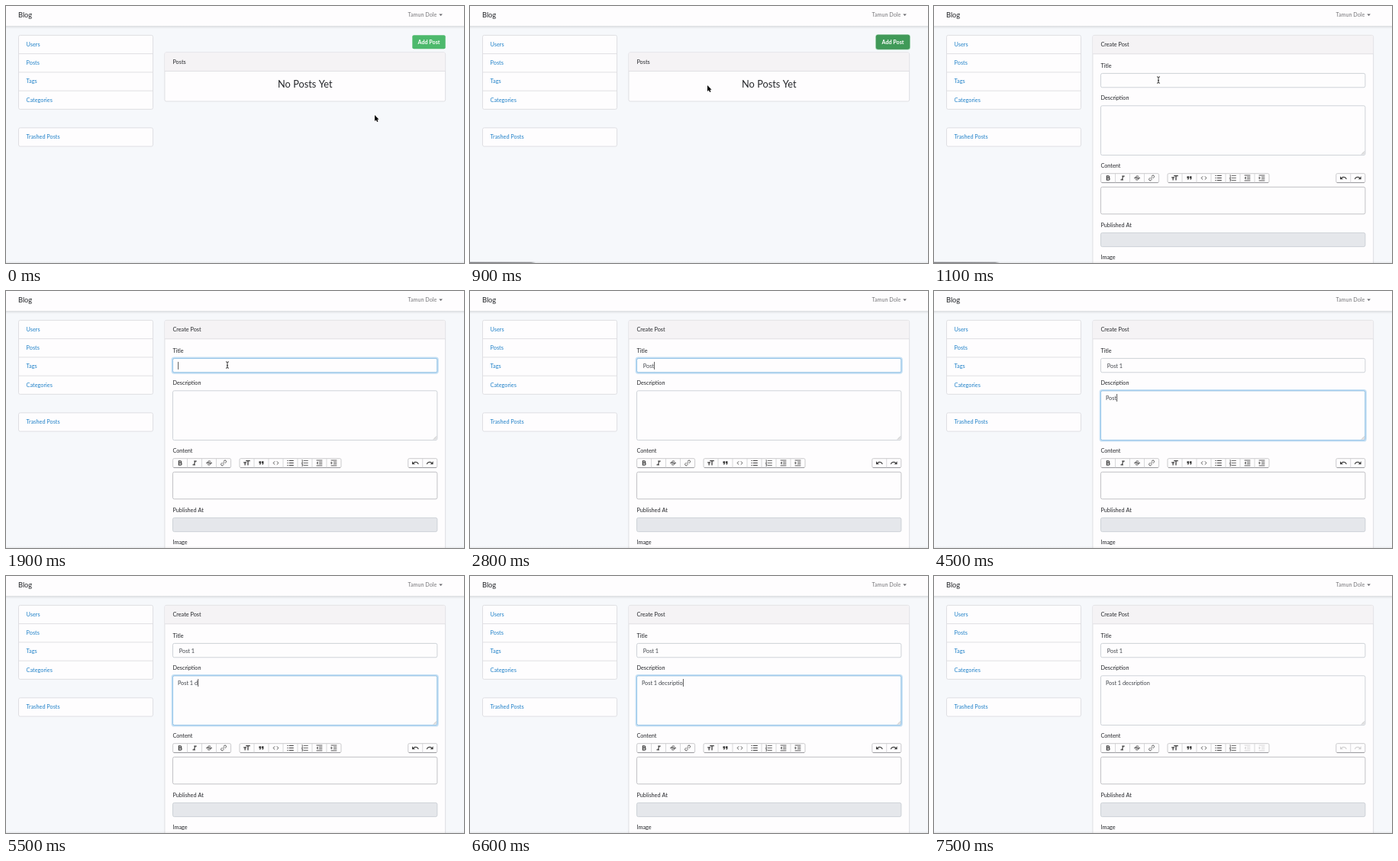
An HTML page with a canvas that plays this animation: 600x337 px, repeating every 8000 ms.

```html
<!DOCTYPE html>
<html lang="en">
<head>
<meta charset="utf-8">
<title>Blog</title>
<style>
html, body { margin: 0; width: 100%; height: 100%; overflow: hidden; background: #f6f8fb; }
canvas { display: block; width: 600px; height: 337px; }
</style>
</head>
<body>
<canvas id="stage"></canvas>
<script>
const W = 600, H = 337, LOOP = 8000, STEP = 100;
const canvas = document.getElementById('stage');
const ctx = canvas.getContext('2d');
const dpr = window.devicePixelRatio || 1;
canvas.width = Math.round(W * dpr);
canvas.height = Math.round(H * dpr);

const INK = '#24262a', LINK = '#1f80c8', LINE = '#dcdce0', FIELD = '#c9ced4', PAPER = '#fefdfe';
const FONT = 'Lato, "Open Sans", sans-serif';

const title = { text: ' Post 1', times: [2200, 2300, 2500, 2600, 2800, 3000, 3200] };
const summary = {
  text: 'Post 1 decsription',
  times: [4000, 4200, 4300, 4500, 4900, 5100, 5400, 5500, 5600, 5700, 5800, 6000, 6100, 6300, 6400, 6500, 6600, 6800]
};

// Pointer path: time, x, y
const track = [
  [0, 483, 143], [100, 488, 134], [300, 538, 62], [400, 550, 49], [600, 551, 48],
  [700, 520, 56], [800, 404, 86], [900, 311, 104], [1000, 297, 99], [1100, 294, 97],
  [1400, 294, 97], [1500, 291, 97], [1600, 290, 97]
];

// Icons on a 24 unit grid; "fill" ones are solid, the rest are stroked
const icons = {
  bold: { d: 'M8 6v12h5.5a3 3 0 0 0 0-6.2H8h4.7a2.9 2.9 0 0 0 0-5.8z', w: 2.8 },
  italic: { d: 'M10 6.3h8M6 17.7h8M14 6l-4 12', w: 2.7 },
  strike: { d: 'M3 12h18M17 7.5C14 5.5 8 5.5 8 9c0 2 2 3 4 3s4 1.5 4 3c0 3.5-6 3.5-9 1.5', w: 2.2 },
  link: { d: 'M9.5 14.5l5-5M11 8l3-3a3.5 3.5 0 0 1 5 5l-3 3M13 16l-3 3a3.5 3.5 0 0 1-5-5l3-3', w: 2 },
  heading: { d: 'M9 4v3h5v12h3V7h5V4zM2 9v3h3v7h3v-7h3V9z', fill: true },
  quote: { d: 'M6 17h3l2-4V7H5v6h3zM14 17h3l2-4V7h-6v6h3z', fill: true },
  code: { d: 'M9 7l-5 5 5 5M15 7l5 5-5 5', w: 2 },
  bullets: { d: 'M2.5 5h3M2.5 12h3M2.5 19h3M8 5h14M8 12h14M8 19h14', w: 2.6 },
  numbers: { d: 'M3 3h1.5v5M2.5 10h3l-3 4h3M2.5 16h3v5h-3M8 5h14M8 12h14M8 19h14', w: 1.8 },
  outdent: { d: 'M3 4h18M11 9.3h10M11 14.6h10M3 20h18M7 9l-3 3 3 3z', w: 2 },
  indent: { d: 'M3 4h18M11 9.3h10M11 14.6h10M3 20h18M4 9l3 3-3 3z', w: 2 },
  undo: { d: 'M12.5 8c-2.6 0-5 1-6.9 2.6L2 7v9h9l-3.6-3.6A8 8 0 0 1 20 16l2.4-.8A10.5 10.5 0 0 0 12.5 8z', fill: true },
  redo: { d: 'M11.5 8c2.6 0 5 1 6.9 2.6L22 7v9h-9l3.6-3.6A8 8 0 0 0 4 16l-2.4-.8A10.5 10.5 0 0 1 11.5 8z', fill: true }
};
for (const icon of Object.values(icons)) icon.path = new Path2D(icon.d);

const arrowPath = new Path2D('M0 0V8L1.8 6.3 3.1 9 4.5 8.3 3.2 5.8H5.5z');
const handPath = new Path2D('M0 0Q1-.9 1.8 0V3.3L5.2 4Q6 4.4 5.8 6L5 9H.7L-2 5.7Q-2 4.4 0 5.4z');

function text(str, x, mid, color = INK, size = 7.3, align = 'left', weight = 400) {
  ctx.font = `${weight} ${size}px ${FONT}`;
  ctx.textAlign = align;
  ctx.fillStyle = color;
  ctx.fillText(str, x, mid + size * 0.36);
}

function rect(x, y, w, h, color) {
  ctx.fillStyle = color;
  ctx.fillRect(x, y, w, h);
}

function box(x, y, w, h, r, fill, stroke, line = 0.9) {
  ctx.beginPath();
  ctx.roundRect(x, y, w, h, r);
  if (fill) { ctx.fillStyle = fill; ctx.fill(); }
  if (stroke) { ctx.strokeStyle = stroke; ctx.lineWidth = line; ctx.stroke(); }
}

function vGrad(y0, y1, from, to) {
  const g = ctx.createLinearGradient(0, y0, 0, y1);
  g.addColorStop(0, from);
  g.addColorStop(1, to);
  return g;
}

function navbar() {
  rect(0, 26, W, 4, vGrad(26, 30, 'rgba(0,0,0,.11)', 'rgba(0,0,0,0)'));
  rect(0, 0, W, 26, PAPER);
  text('Blog', 16, 12, INK, 9.3);
  text('Tamun Dole', 564.3, 11.6, '#77777a', 7.2, 'right');
  ctx.fillStyle = '#66666a';
  ctx.beginPath();
  ctx.moveTo(567.3, 10.6);
  ctx.lineTo(571.9, 10.6);
  ctx.lineTo(569.6, 13);
  ctx.fill();
}

function list(y, items) {
  const row = 24.25;
  box(16.5, y, 176, row * items.length, 2, PAPER, LINE);
  items.forEach((item, i) => {
    if (i) rect(16.5, y + row * i - 0.45, 176, 0.9, LINE);
    text(item, 26.6, y + row * i + 11.9, LINK);
  });
}

function card(y, h, name) {
  box(207.9, y, 367.7, h, 2, PAPER, LINE);
  rect(208.3, y + 0.4, 366.9, 24, '#f5f3f5');
  rect(208, y + 24, 367.5, 0.9, LINE);
  text(name, 218.4, y + 12);
}

function indexPage(t) {
  const hover = t >= 300, pressed = t >= 600;
  if (pressed) box(531.2, 37.2, 45.6, 20.2, 3, '#9edbb1');
  box(532.3, 38.2, 43.4, 18, 2, hover ? '#409a58' : '#4db96c', pressed ? '#3b8c50' : null);
  text('Add Post', 554, 47.2, '#fff', 7.2, 'center', 700);
  card(60.9, 64.1, 'Posts');
  text('No Posts Yet', 391.8, 102.5, INK, 12.8, 'center');
}

function caret(x, y) {
  rect(x, y, 0.8, 10, '#333');
}

function typed(entry, t) {
  return entry.text.slice(0, entry.times.filter(at => at <= t).length);
}

// Share of the focus glow, easing in and out over 150 ms
function glow(t, on, off) {
  const ramp = at => Math.max(0, Math.min(1, (t - at + 50) / 150));
  return ramp(on) - ramp(off);
}

function field(y, h, focus, fill = PAPER) {
  box(218.5, y, 346.4, h, 2, fill, FIELD);
  if (focus <= 0) return;
  ctx.globalAlpha = focus;
  box(217.7, y - 0.8, 348, h + 1.6, 2.5, null, '#c6e0f4', 2.2);
  box(218.5, y, 346.4, h, 2, null, '#8fc2e8');
  ctx.globalAlpha = 1;
}

function entryText(str, x, mid, focused) {
  text(str, x, mid, '#3f4349');
  if (focused) caret(x + ctx.measureText(str).width + 0.3, mid - 5);
}

function drawIcon(name, x, faded) {
  const { path, fill, w } = icons[name];
  ctx.save();
  ctx.globalAlpha = faded ? 0.2 : 0.88;
  ctx.translate(x, 225.5);
  ctx.scale(0.43, 0.43);
  ctx.translate(-12, -12);
  ctx.fillStyle = ctx.strokeStyle = '#222';
  ctx.lineWidth = w;
  if (fill) ctx.fill(path); else ctx.stroke(path);
  ctx.restore();
}

function toolGroup(x, names, faded) {
  const cell = 19, w = cell * names.length;
  box(x, 219.7, w, 11.9, 1.6, PAPER, '#c4c4c7');
  rect(x + 1, 231.2, w - 2, 0.9, '#96969a');
  names.forEach((name, i) => {
    if (i) rect(x + cell * i - 0.4, 219.7, 0.8, 11.7, '#cfcfd2');
    drawIcon(name, x + cell * (i + 0.5), faded.includes(name));
  });
}

function resizeGrip() {
  ctx.strokeStyle = '#8a8a8e';
  ctx.lineWidth = 0.6;
  ctx.beginPath();
  for (const d of [4, 2]) {
    ctx.moveTo(564 - d, 194.6);
    ctx.lineTo(564, 194.6 - d);
  }
  ctx.stroke();
}

function formPage(t) {
  card(38.4, 310, 'Create Post');

  text('Title', 218.4, 78.3);
  field(88.4, 18.4, glow(t, 1800, 3500));
  entryText(typed(title, t), 225, 97.9, t >= 1800 && t < 3500);

  text('Description', 218.4, 120.8);
  field(130.8, 64.8, glow(t, 3500, 7000));
  resizeGrip();
  entryText(typed(summary, t), 224.9, 140, t >= 3500 && t < 7000);

  text('Content', 218.4, 209.6);
  const faded = t >= 7000 ? ['outdent', 'indent', 'undo', 'redo'] : [];
  toolGroup(218.6, ['bold', 'italic', 'strike', 'link'], faded);
  toolGroup(306, ['heading', 'quote', 'code', 'bullets', 'numbers', 'outdent', 'indent'], faded);
  toolGroup(526.8, ['undo', 'redo'], faded);
  box(218.5, 237.4, 346.4, 35.4, 2, PAPER, '#bcbcc0');
  if (t >= 7100 && t < 7500) caret(223.2, 241.5);

  text('Published At', 218.4, 287.3);
  field(297.4, 18.2, 0, '#e5e7eb');
  text('Image', 218.4, 329.6);
}

function pointerAt(t) {
  const next = track.findIndex(k => k[0] > t);
  if (next < 0) return track[track.length - 1].slice(1);
  const [t0, x0, y0] = track[next - 1], [t1, x1, y1] = track[next];
  const p = (t - t0) / (t1 - t0);
  return [x0 + (x1 - x0) * p, y0 + (y1 - y0) * p];
}

function pointer(t) {
  if (t >= 2200) return;
  ctx.save();
  ctx.translate(...pointerAt(t));
  ctx.lineJoin = 'round';
  if (t >= 1000) {
    const beam = new Path2D('M-2-4.2Q0-4.2 0-3 0-4.2 2-4.2M0-3V3M-2 4.2Q0 4.2 0 3 0 4.2 2 4.2M-1 .8H1');
    ctx.strokeStyle = '#222';
    ctx.lineWidth = 0.9;
    ctx.stroke(beam);
  } else {
    const hand = t >= 300 && t < 700;
    const shape = hand ? handPath : arrowPath;
    ctx.strokeStyle = hand ? '#111' : '#fff';
    ctx.lineWidth = hand ? 0.8 : 1.2;
    ctx.fillStyle = hand ? '#fff' : '#000';
    ctx.stroke(shape);
    ctx.fill(shape);
  }
  ctx.restore();
}

function bottomEdge(t) {
  rect(0, 335, W, 2, vGrad(335, 337, 'rgba(0,0,0,.01)', 'rgba(0,0,0,.07)'));
  if (t < 500 || t >= 1300) return;
  const g = ctx.createLinearGradient(0, 0, 86, 0);
  g.addColorStop(0, 'rgba(70,70,75,.65)');
  g.addColorStop(0.93, 'rgba(70,70,75,.55)');
  g.addColorStop(1, 'rgba(70,70,75,0)');
  ctx.globalAlpha = t >= 1200 ? 0.5 : 1;
  rect(0, 335.7, 86, 1.3, g);
  ctx.globalAlpha = 1;
}

function draw(t) {
  ctx.setTransform(dpr, 0, 0, dpr, 0, 0);
  rect(0, 0, W, H, '#f6f8fb');
  navbar();
  list(38.4, ['Users', 'Posts', 'Tags', 'Categories']);
  list(159.8, ['Trashed Posts']);
  if (t < 1000) indexPage(t); else formPage(t);
  bottomEdge(t);
  pointer(t);
}

const start = performance.now();
function tick() {
  const t = (performance.now() - start) % LOOP;
  draw(Math.floor(t / STEP) * STEP);
  requestAnimationFrame(tick);
}
tick();
</script>
</body>
</html>
```
